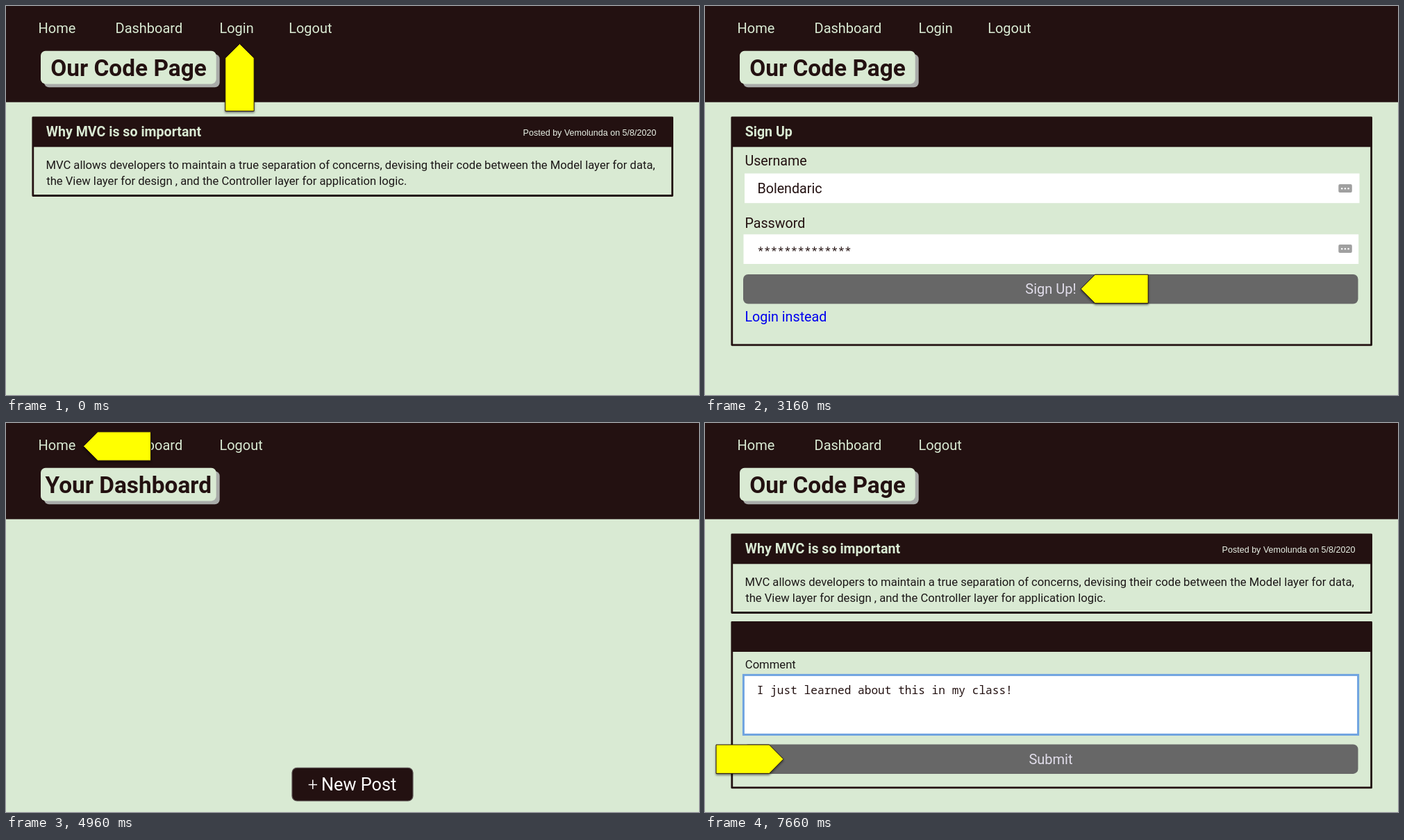
Write an HTML page that moves like this. It is 998x561 px and loops after 8 s.

```html
<!DOCTYPE html>
<html lang="en">
<head>
<meta charset="utf-8">
<title>Blog walkthrough</title>
<style>
  :root { --dark: #231111; --mint: #d9ead3; }
  html, body { margin: 0; width: 100%; height: 100%; overflow: hidden; background: var(--mint); }
  svg { display: block; width: 100vw; height: 100vh; font: 19.7px Roboto, sans-serif; fill: var(--dark); }
  text { white-space: pre; }

  .mint, .nav { fill: var(--mint); }
  .nav { font-size: 20px; }
  .title { font-size: 33.4px; font-weight: 700; text-anchor: middle; }
  .heading { font-size: 19.6px; font-weight: 700; fill: var(--mint); }
  .body { font-size: 16.65px; fill: #1c1818; }
  .byline { font: 12.55px "Liberation Sans", Arial, sans-serif; fill: #e9f1e6; }
  .mono { font: 16.15px "Noto Sans Mono", monospace; }
  .frame { fill: none; stroke: var(--dark); stroke-width: 2.8; stroke-linejoin: round; }
  .white { fill: #fff; }
  .grey { fill: #676767; }
  .action { font-size: 20px; text-anchor: middle; fill: #e1ddea; }
  .muted { fill: #aaa5a3; }
  .arrow { filter: drop-shadow(0 2px 1.5px rgba(0, 0, 0, .5)); }

  .scene { visibility: hidden; animation: 8s step-end infinite; }
  #landing { animation-name: landing; }
  #login { animation-name: login; }
  #signup { animation-name: signup; }
  #dashboard { animation-name: dashboard; }
  #posts { animation-name: posts; }
  #comment { animation-name: comment; }
  @keyframes landing { 0% { visibility: visible } 14.125%, 100% { visibility: hidden } }
  @keyframes login { 0% { visibility: hidden } 14.125% { visibility: visible } 39.5%, 100% { visibility: hidden } }
  @keyframes signup { 0% { visibility: hidden } 39.5% { visibility: visible } 62%, 100% { visibility: hidden } }
  @keyframes dashboard { 0% { visibility: hidden } 62% { visibility: visible } 77.375%, 100% { visibility: hidden } }
  @keyframes posts { 0% { visibility: hidden } 77.375% { visibility: visible } 95.75%, 100% { visibility: hidden } }
  @keyframes comment { 0% { visibility: hidden } 95.75%, 100% { visibility: visible } }
</style>
</head>
<body>
<svg viewBox="0 0 998 561" preserveAspectRatio="none">
  <defs>
    <path id="pointer" d="M0 0 20.5-20.7H97V20.7H20.5Z" fill="#ff0" stroke="#231111"/>
    <g id="guest-nav" class="nav">
      <text x="307.4" y="38.7">Login</text>
      <text x="407.2" y="38.7">Logout</text>
    </g>
    <text id="user-nav" class="nav" x="307.4" y="38.7">Logout</text>
    <text id="site-title" class="title" x="176.5" y="101">Our Code Page</text>
    <g id="post-box">
      <rect class="frame" x="38.8" y="160.8" width="920.8" height="112.7"/>
      <rect x="38" y="160" width="922" height="43.3"/>
    </g>
    <text id="byline" class="byline" x="744.6" y="187.3">Posted by Vemolunda on 5/8/2020</text>
    <g id="mvc-post">
      <use href="#post-box"/>
      <text class="body" x="57.4" y="235">MVC allows developers to maintain a true separation of concerns, devising their code between the Model layer for data,</text>
      <text class="body" x="58.2" y="258">the View layer for design , and the Controller layer for application logic.</text>
    </g>
    <g id="key-icon">
      <rect width="19.5" height="12" rx="2" fill="#a0a0a0"/>
      <g class="white">
        <circle cx="4.9" cy="6.3" r="1.2"/>
        <circle cx="9.6" cy="6.3" r="1.2"/>
        <circle cx="14.3" cy="6.3" r="1.2"/>
      </g>
    </g>
    <g id="form">
      <rect class="frame" x="38.8" y="160.8" width="920.8" height="328"/>
      <rect x="38" y="160" width="922" height="43.3"/>
      <text x="57.4" y="229.8">Username</text>
      <rect class="white" x="57" y="241.5" width="885.5" height="42.7"/>
      <use href="#key-icon" x="912.3" y="257"/>
      <text x="57.4" y="319.8">Password</text>
      <rect class="white" x="55.5" y="329.3" width="885.7" height="42.7"/>
      <use href="#key-icon" x="912.3" y="344"/>
      <rect class="grey" x="55" y="387" width="885.5" height="42.5" rx="7"/>
    </g>
  </defs>

  <rect class="mint" width="998" height="561"/>
  <rect width="998" height="138.7"/>
  <g class="nav">
    <text x="46.5" y="38.7">Home</text>
    <text x="157.5" y="38.7">Dashboard</text>
  </g>
  <rect x="55" y="69.5" width="252.7" height="47.7" rx="7" fill="#a9aba9"/>
  <rect class="mint" x="50" y="64.7" width="252.7" height="47.7" rx="7"/>

  <g id="landing" class="scene">
    <use href="#guest-nav"/>
    <use href="#site-title"/>
    <use href="#mvc-post"/>
    <text class="heading" x="57.8" y="187.6">Why MVC is so important</text>
    <use href="#byline"/>
    <g class="arrow"><use href="#pointer" transform="translate(336.5 54.5) rotate(90)"/></g>
  </g>

  <g id="login" class="scene">
    <use href="#guest-nav"/>
    <use href="#site-title"/>
    <use href="#form"/>
    <text class="heading" x="57.3" y="187.6">Login</text>
    <text class="action" x="498" y="415.3">Login!</text>
    <rect x="58" y="436.3" width="133" height="23.6" fill="#4a86e8"/>
    <text class="white" x="57.6" y="455">Sign up instead</text>
    <g class="arrow"><use href="#pointer" transform="translate(196.5 450.2)"/></g>
  </g>

  <g id="signup" class="scene">
    <use href="#guest-nav"/>
    <use href="#site-title"/>
    <use href="#form"/>
    <text class="heading" x="57.7" y="187.6">Sign Up</text>
    <text x="75.4" y="269.7">Bolendaric</text>
    <text class="mono" x="75.2" y="360">**************</text>
    <text class="action" x="498" y="415.3">Sign Up!</text>
    <text x="57.4" y="455" fill="#0000ee">Login instead</text>
    <g class="arrow"><use href="#pointer" transform="translate(541.2 408)"/></g>
  </g>

  <g id="dashboard" class="scene">
    <use href="#user-nav"/>
    <text class="title" x="176.3" y="101">Your Dashboard</text>
    <rect x="412" y="497.3" width="174" height="47.7" rx="7" stroke="#5c5353" stroke-width="1.2"/>
    <g class="white" font-size="25.3">
      <text x="434.8" y="530" font-weight="300">+</text>
      <text x="454" y="530">New Post</text>
    </g>
    <g class="arrow"><use href="#pointer" transform="translate(111.5 33.5)"/></g>
  </g>

  <g id="posts" class="scene">
    <use href="#user-nav"/>
    <use href="#site-title"/>
    <use href="#mvc-post"/>
    <text class="heading" x="57.8" y="187.6" style="fill:#a29e9c">Why MVC is so important</text>
    <text class="byline" x="744.6" y="187.3" style="fill:#b0aaa8">Posted by Vemolunda on 5/8/2020</text>
    <use href="#post-box" y="126.7"/>
    <text class="heading" x="58" y="314.3">Authentication vs. Authorization</text>
    <text class="byline" x="744.6" y="314" style="fill:#b0aaa8">Posted by Vemolunda on 5/8/2020</text>
    <text class="body" x="58" y="361.7">There is a difference between authentication and authorization. Authentication means confirming your own identity,</text>
    <text class="body" x="58.2" y="384.7">whereas authorization means being allowed access to the system.</text>
    <g class="arrow"><use href="#pointer" transform="translate(295.5 182.2)"/></g>
  </g>

  <g id="comment" class="scene">
    <use href="#user-nav"/>
    <use href="#site-title"/>
    <use href="#mvc-post"/>
    <text class="heading" x="57.8" y="187.6">Why MVC is so important</text>
    <use href="#byline"/>
    <rect class="frame" x="38.8" y="287.5" width="920.8" height="238.4"/>
    <rect x="38" y="286.7" width="922" height="43.3"/>
    <text class="body" x="57.8" y="353.5">Comment</text>
    <rect x="55.4" y="363.4" width="885.2" height="86" fill="#fff" stroke="#6fa3e0" stroke-width="3"/>
    <text class="mono" x="74.8" y="391">I just learned about this in my class!</text>
    <rect class="grey" x="55" y="463.4" width="885.5" height="42.5" rx="7"/>
    <text class="action" x="498" y="491.8">Submit</text>
    <g class="arrow"><use href="#pointer" transform="translate(113 484.7) rotate(180)"/></g>
  </g>
</svg>
</body>
</html>
```
